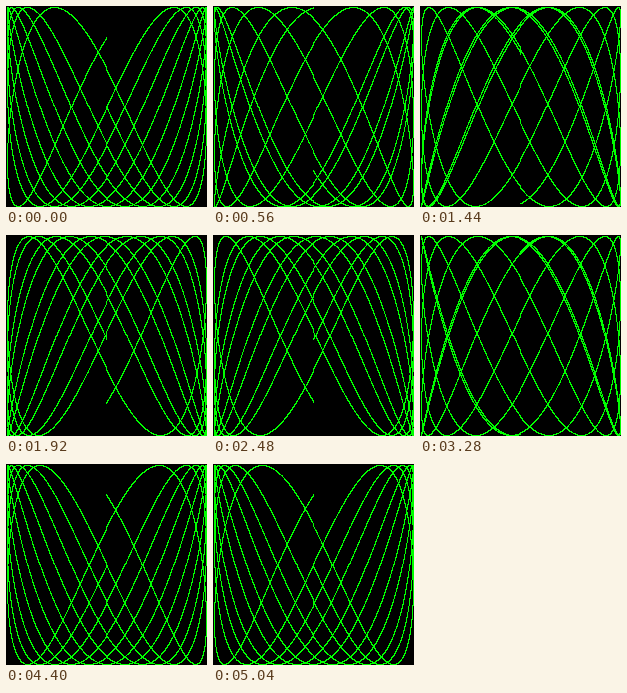
Recreate the animation shown at these times as an HTML page with a canvas. Size 201x201 px, loop 5120 ms.

```html
<!DOCTYPE html>
<html lang="en">
<head>
<meta charset="utf-8">
<title>Lissajous curve</title>
<style>
  html, body { margin: 0; width: 100%; height: 100%; overflow: hidden; background: #000; }
  canvas { display: block; width: 201px; height: 201px; image-rendering: pixelated; }
</style>
</head>
<body>
<canvas id="stage" width="201" height="201"></canvas>
<script>
  const RADIUS = 100;
  const SIDE = 2 * RADIUS + 1;
  const CYCLES = 5;
  const STEP = 0.001;
  const FREQ = 2.12488;
  const PHASE_STEP = 0.1;
  const POSES = 64;
  const HOLD = 80;

  const ctx = document.getElementById('stage').getContext('2d');
  const image = ctx.createImageData(SIDE, SIDE);
  const pixels = new Uint32Array(image.data.buffer);
  const BLACK = 0xff000000;
  const GREEN = 0xff00ff00;

  // Truncates toward zero, which leaves a small notch on the centre lines.
  const toPixel = v => RADIUS + Math.trunc(v * RADIUS + 0.5);

  function draw(phase) {
    pixels.fill(BLACK);
    for (let t = 0; t < CYCLES * 2 * Math.PI; t += STEP) {
      const x = toPixel(Math.sin(t));
      const y = toPixel(Math.sin(t * FREQ + phase));
      pixels[y * SIDE + x] = GREEN;
    }
    ctx.putImageData(image, 0, 0);
  }

  const start = performance.now();
  let shown = -1;

  function tick() {
    const pose = Math.floor((performance.now() - start) / HOLD) % POSES;
    if (pose !== shown) {
      shown = pose;
      draw(pose * PHASE_STEP);
    }
    requestAnimationFrame(tick);
  }
  tick();
</script>
</body>
</html>
```
